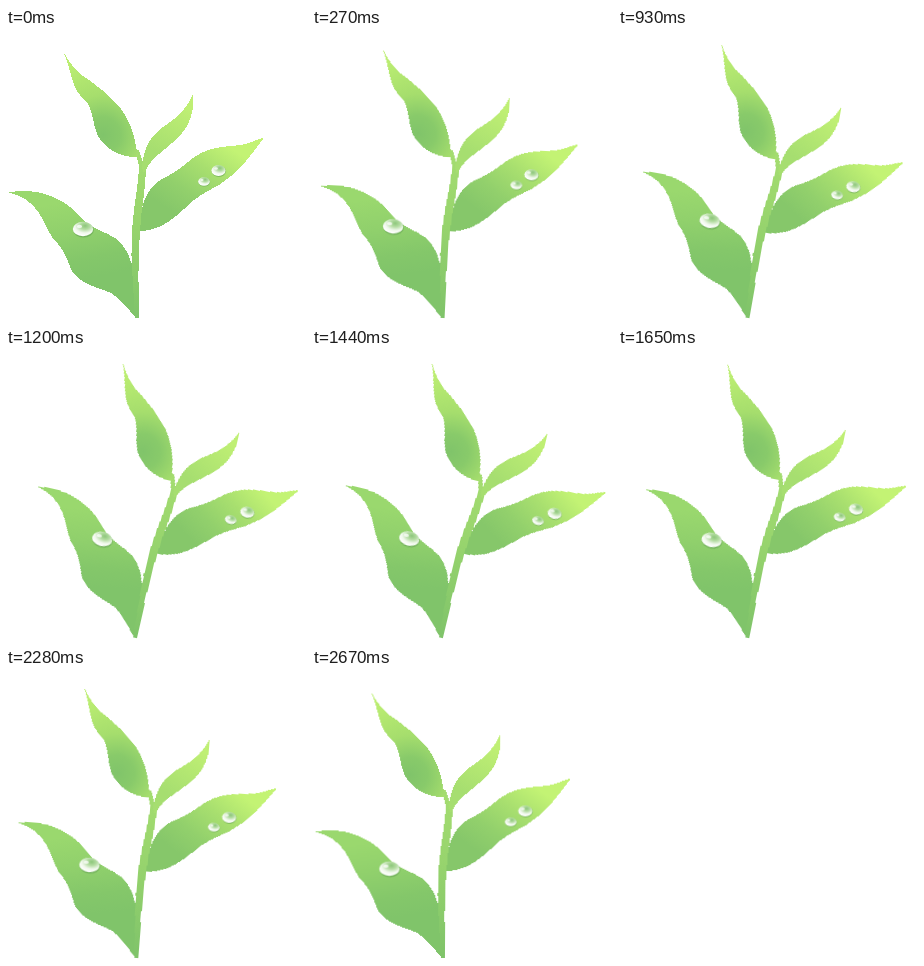
An HTML page for the animation above (2.7 s loop, 300 by 292 pixels).

```html
<!DOCTYPE html>
<html lang="en">
<head>
<meta charset="utf-8">
<title>Swaying sprout</title>
<style>
html, body { margin: 0; width: 100%; height: 100%; overflow: hidden; background: #fff; }
svg { display: block; width: 300px; height: 292px; }
path { shape-rendering: crispEdges; }
#plant { transform-origin: 131px 281px; animation: sway 2700ms infinite; }
@keyframes sway {
  0%, 100% { transform: rotate(0deg); animation-timing-function: steps(45, end); }
  50% { transform: rotate(14.5deg); animation-timing-function: steps(45, end); }
}
</style>
</head>
<body>
<svg viewBox="0 0 300 292">
  <defs>
    <radialGradient id="top" gradientUnits="userSpaceOnUse" cx="97" cy="107" r="80">
      <stop offset="0" stop-color="#80c46a"/>
      <stop offset=".22" stop-color="#88ca6a"/>
      <stop offset=".5" stop-color="#a6de6d"/>
      <stop offset="1" stop-color="#bcee72"/>
    </radialGradient>
    <linearGradient id="small" gradientUnits="userSpaceOnUse" x1="176" y1="76" x2="150" y2="124">
      <stop offset="0" stop-color="#bfef74"/>
      <stop offset="1" stop-color="#a6de70"/>
    </linearGradient>
    <linearGradient id="right" gradientUnits="userSpaceOnUse" x1="216" y1="114" x2="168" y2="185">
      <stop offset="0" stop-color="#c3f374"/>
      <stop offset=".35" stop-color="#a8df6f"/>
      <stop offset=".7" stop-color="#92d06c"/>
      <stop offset="1" stop-color="#86c76a"/>
    </linearGradient>
    <linearGradient id="left" gradientUnits="userSpaceOnUse" x1="68" y1="172" x2="82" y2="250">
      <stop offset="0" stop-color="#9ad86e"/>
      <stop offset=".4" stop-color="#90d06c"/>
      <stop offset=".75" stop-color="#84c76a"/>
      <stop offset="1" stop-color="#80c46a"/>
    </linearGradient>
    <linearGradient id="stem" gradientUnits="userSpaceOnUse" x1="134" y1="130" x2="130" y2="285">
      <stop offset="0" stop-color="#a3dc70"/>
      <stop offset=".45" stop-color="#96d36d"/>
      <stop offset="1" stop-color="#80c46a"/>
    </linearGradient>
    <radialGradient id="water" cx=".6" cy=".28" r=".7">
      <stop offset="0" stop-color="#8cc67a"/>
      <stop offset=".35" stop-color="#b4dca2"/>
      <stop offset=".7" stop-color="#f0f8ec"/>
      <stop offset="1" stop-color="#fff"/>
    </radialGradient>
    <g id="drop">
      <ellipse cx=".5" cy="1" rx="10.4" ry="7.4" fill="#5f9d50" opacity=".55"/>
      <ellipse rx="10.2" ry="7.2" fill="url(#water)"/>
      <ellipse cx="-3.5" cy="-2.6" rx="2.6" ry="1.6" fill="#fff" opacity=".75"/>
    </g>
  </defs>
  <g id="plant">
    <path fill="url(#right)" d="M258 109.500C247 113 238 118 225 118C210 119 197 122 187 130C178 137 172 143 160 149C144 156 134 172 133 203C152 203 165 193 178 181C189 169 202 163 213 157C234 144 244 128 258 109.500Z"/>
    <path fill="url(#left)" d="M3 164.500C19 161 34 164 45 168C62 174 70 185 81 195C89 202 98 203 109 210C120 218 127 232 128 250L133 290H130C122 281 115 271 105 265C92 259 75 257 66 243C61 232 59 224 52 216C42 207 40 195 33 185C26 175 18 168 3 164.500Z"/>
    <path fill="url(#stem)" d="M128 122C131 131 133 135 133 141C132 158 128 177 126.500 197C125 217 125 237 127 257L129 290H133.500C132 264 132 230 134 203C135 181 140 160 140 140L138 138C136 132 135 128 133 122Z"/>
    <path fill="url(#small)" d="M187.500 65C182 78 174 88 162 95.500C146 106 138 117 136 139L138 145C144 131 155 125 166 115C181 102 188 91 187.500 65Z"/>
    <path fill="url(#top)" d="M57 23C65 38 72 46 83 52C92 58 101 66 110 75C126 92 129 112 132 129C117 130 105 124 96 114C86 102 89 88 82 76C78 71 73 68 69 59C64 48 64 38 57 23Z"/>
    <use href="#drop" transform="translate(77 201)"/>
    <use href="#drop" transform="translate(212.500 142.500) scale(.69 .76)"/>
    <use href="#drop" transform="translate(198 153.500) scale(.57 .6)"/>
  </g>
</svg>
</body>
</html>
```
